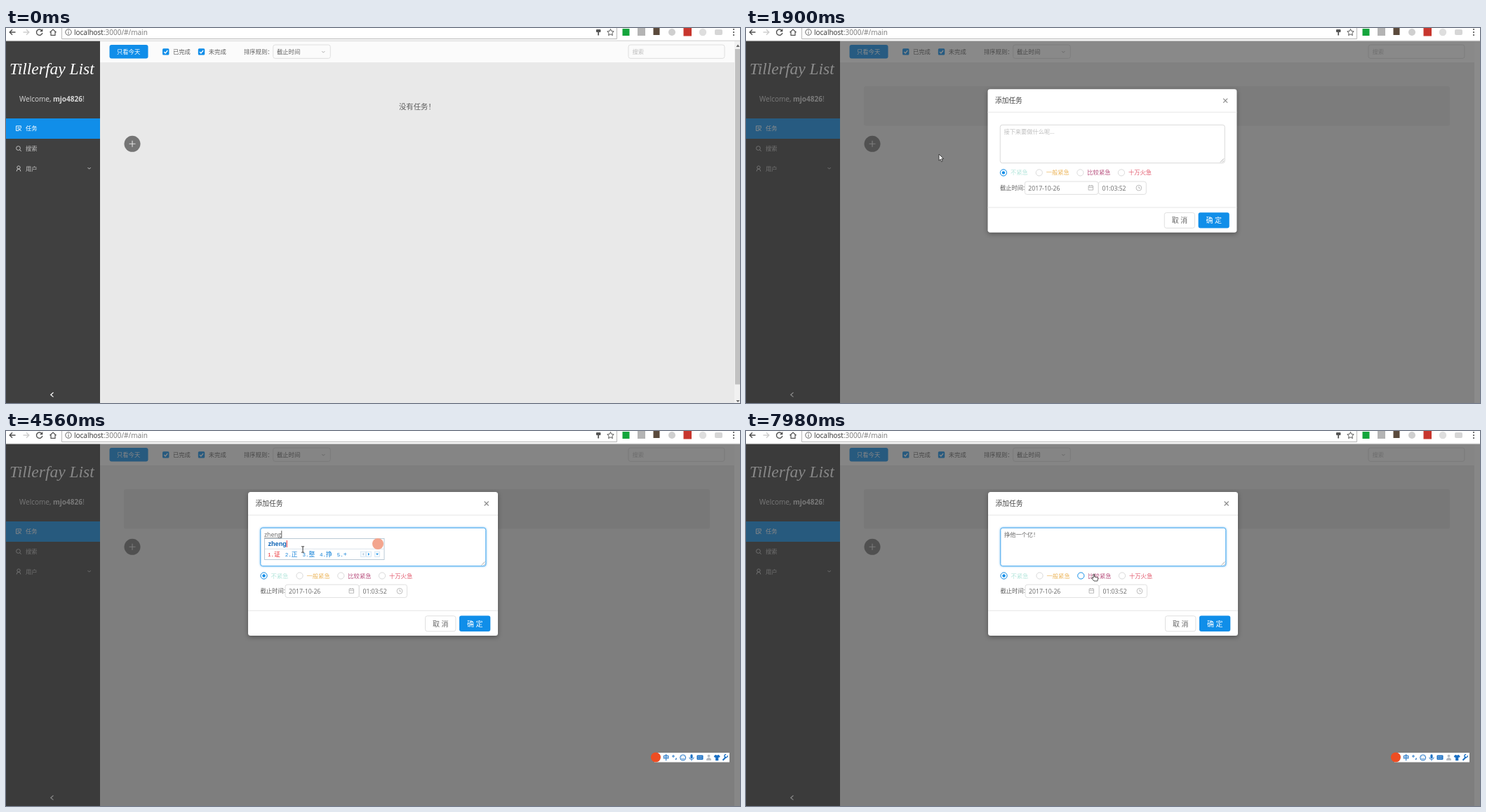
Recreate the animation shown at these times as an HTML page. Size 1046 by 535 pixels, loop 8000 ms.

```html
<!DOCTYPE html>
<html>
<head>
<meta charset="utf-8">
<style>
html, body { margin: 0; width: 100%; height: 100%; overflow: hidden; background: #fff; }
svg { display: block; font-family: "Open Sans", "Noto Sans CJK SC", sans-serif; }
text { white-space: pre; }
</style>
</head>
<body>
<svg id="stage" width="1046" height="535" viewBox="0 0 1046 535"></svg>
<script>
const BLUE = '#108ee9', LOOP = 8000;

const text = (x, y, size, fill, s, more = '') =>
  `<text x="${x}" y="${y}" font-size="${size}" fill="${fill}" ${more}>${s}</text>`;
const rect = (x, y, w, h, fill, more = '') =>
  `<rect x="${x}" y="${y}" width="${w}" height="${h}" fill="${fill}" ${more}/>`;
const box = (x, y, w, h, stroke = '#d9d9d9', fill = '#fff') =>
  rect(x, y, w, h, fill, `rx="3" stroke="${stroke}" stroke-width=".8"`);
const dot = (x, y, r, fill, more = '') =>
  `<circle cx="${x}" cy="${y}" r="${r}" fill="${fill}" ${more}/>`;
const line = (d, stroke, w = 1, more = '') =>
  `<path d="${d}" fill="none" stroke="${stroke}" stroke-width="${w}" ${more}/>`;
const shape = (d, fill, more = '') => `<path d="${d}" fill="${fill}" ${more}/>`;

const chrome = () =>
  rect(0, 0, 1046, 18, '#fff') +
  line('M0 18.2H1046', '#c4c4c4', .8) +
  line('M13.5 6H5.5M9 2.2L5.2 6L9 9.8', '#505050', 1.4) +
  line('M24.5 6H32.5M29 2.2L32.8 6L29 9.8', '#cfcfcf', 1.4) +
  line('M51 3.6A4.2 4.2 0 1 0 51.8 7', '#505050', 1.4) + shape('M52.3 1V5.2H48Z', '#505050') +
  line('M62.5 6.2L67 2L71.5 6.2M64 5.5V10.3H70V5.5', '#505050', 1.2) +
  line('M79.5 0V15.5H870.5V0', '#b9b9b9') +
  dot(89, 6, 4.2, 'none', 'stroke="#666"') + line('M89 5.4V8.6M89 3.3V4.4', '#666') +
  text(97, 9.5, 10, '#333', 'localhost<tspan fill="#767676">:3000/#/main</tspan>') +
  rect(841, 2, 6.5, 4, '#555', 'rx="1"') + line('M844.2 5V10.5', '#555', 1.8) +
  shape('M861.5 1.5l1.4 3 3.3.4-2.4 2.3.6 3.3-2.9-1.6-2.9 1.6.6-3.3-2.4-2.3 3.3-.4z', 'none', 'stroke="#555"') +
  rect(878.5, 1, 10, 10, '#14a53c') +
  rect(900, 0, 11, 11, '#b4b4b4') +
  rect(922.5, 0, 9, 10, '#5b4a3c') +
  dot(949, 6, 5, '#cfcfcf') +
  rect(965.5, 0, 11.5, 11.5, '#c8362e') +
  dot(993, 6, 5.2, '#dedede') +
  rect(1010, 2, 11, 8, '#d6d6d6', 'rx="2"') +
  [2, 6, 10].map(y => dot(1037, y, 1.1, '#505050')).join('');

const sidebar = () =>
  rect(0, 18.5, 134, 516.5, '#404040') +
  text(5, 66, 23.5, '#fff', 'Tillerfay List', 'font-family="Liberation Serif, serif" font-style="italic"') +
  text(19, 105, 10, '#d8d8d8', 'Welcome, <tspan font-weight="700">mjo4826</tspan>!') +
  rect(0, 129, 134, 29, BLUE) +
  line('M18 146.5H14.5V139.8H21.3V143M16.3 142H19.5M16.3 144H18M18.8 144L21.8 147M18.8 144V146.5M18.8 144H21', '#fff', .9) +
  text(28, 146.3, 8.3, '#fff', '任务') +
  dot(17.5, 171.5, 2.9, 'none', 'stroke="#c4c4c4"') + line('M19.6 173.6L21.8 176', '#c4c4c4') +
  text(28, 175.3, 8.3, '#c4c4c4', '搜索') +
  dot(18, 199, 2.2, 'none', 'stroke="#c4c4c4"') + line('M15.2 204.5Q15.2 201.2 18 201.2T20.8 204.5', '#c4c4c4') +
  text(28, 203.8, 8.3, '#c4c4c4', '用户') +
  line('M116.5 199L118.6 201.2L120.7 199', '#c4c4c4') +
  line('M67.5 520L63.8 523.2L67.5 526.4', '#fff', 1.2);

const checkbox = (x, label) =>
  rect(x, 29.2, 9.4, 9.4, BLUE, 'rx="1.5"') +
  line(`M${x + 2.2} 34L${x + 4.1} 36L${x + 7.3} 32`, '#fff', 1.3) +
  text(x + 15, 37.2, 8.3, '#5c5c5c', label);

const page = () =>
  rect(134, 18.5, 904, 31, '#fbfbfb') +
  rect(134, 49, 904, 486, '#e9e9e9') +
  rect(147.5, 24, 55, 19.6, BLUE, 'rx="3"') +
  text(158, 37.2, 8.3, '#fff', '只看今天') +
  checkbox(223, '已完成') + checkbox(273.8, '未完成') +
  text(339, 37.2, 8.3, '#5c5c5c', '排序规则：') +
  box(380.7, 24, 81.6, 19.4, '#d9d9d9', '#fbfbfb') +
  text(386, 37.2, 8.3, '#5c5c5c', '截止时间') +
  line('M450.2 33L452.3 35.2L454.4 33', '#aaa', .9) +
  box(887, 24, 137, 19.4, '#d9d9d9', '#fbfbfb') +
  text(892.5, 37.2, 8.3, '#bdbdbd', '搜索') +
  rect(168, 83, 835, 56.5, '#dbdbdb', 'rx="3" id="card"') +
  text(560, 115.8, 10.35, '#5c5c5c', '没有任务！', 'id="empty"') +
  dot(180, 165.3, 11.5, '#757575', 'id="plus"') +
  line('M175.5 165.3H184.5M180 160.8V169.8', '#e0e0e0', 1.1) +
  '<g id="scroll">' + rect(1038, 18.5, 8, 516.5, '#f1f1f1') + rect(1039, 30, 7, 478.5, '#c1c1c1') +
  shape('M1040.5 27L1043 23.5L1045.5 27ZM1040.5 531L1043 534L1045.5 531Z', '#666') + '</g>';

const radio = (x, label, color, id = '') =>
  dot(x, 206.5, 4.6, '#fff', `stroke="#d9d9d9" ${id}`) + text(x + 10, 209.6, 8.3, color, label);

const modal = () =>
  rect(345, 87, 356, 205, '#fff', 'rx="3.5" style="filter:drop-shadow(0 2px 3px #0005)"') +
  text(355.5, 107, 9.75, '#444', '添加任务') +
  line('M681.7 100.5l6 6m0-6l-6 6', '#888', 1.1) +
  line('M345 120H701M345 256.3H701', '#e6e6e6') +
  rect(362.8, 138.2, 321, 54.5, '#fff', 'rx="3" id="area"') +
  line('M677.5 191.5l5-5m-2 5l2-2', '#999', .8) +
  radio(367.5, '不紧急', '#b5e6dc') +
  radio(418.5, '一般紧急', '#ecb65c') +
  radio(477.3, '比较紧急', '#b8507e', 'id="third"') +
  radio(536, '十万火急', '#e2566a') +
  dot(367.5, 206.5, 4.6, '#fff', `stroke="${BLUE}"`) + dot(367.5, 206.5, 2.2, BLUE) +
  text(362.5, 231.4, 8.3, '#5c5c5c', '截止时间:') +
  box(398, 219.2, 105, 18.4) + text(403, 231.8, 8.7, '#666', '2017-10-26') +
  line('M489 225.3H495.5V231.3H489ZM489 227.6H495.5M490.7 224V226M493.8 224V226', '#aaa', .8) +
  box(503.5, 219.2, 68, 18.4) + text(508.5, 231.8, 8.6, '#666', '01:03:52') +
  dot(561, 228.3, 3.9, 'none', 'stroke="#aaa" stroke-width=".8"') + line('M561 226V228.6H563', '#aaa', .8) +
  box(597.5, 263.8, 43.4, 22) + text(608, 278.8, 10, '#666', '取 消') +
  rect(646, 263.5, 44.3, 22.4, BLUE, 'rx="3"') + text(657, 278.8, 10, '#fff', '确 定');

const imeBar = () => {
  const c = '#1b70c4';
  return rect(924, 459, 107, 13.5, '#fff') + dot(926, 465.5, 7, '#ee4d22') +
    text(936.3, 469.2, 8.8, c, '中', 'font-weight="700"') +
    dot(951, 464, 1.2, 'none', `stroke="${c}"`) + line('M955 466.5q.6 1.3-.8 2.5', c, 1.3) +
    dot(964.7, 466, 4, 'none', `stroke="${c}"`) + line('M962.5 467q2.2 2.5 4.4 0M963.2 464.3v.9M966.2 464.3v.9', c, .9) +
    rect(975.4, 461.3, 3.2, 6, c, 'rx="1.6"') + line('M973.8 465.5q0 3 3.2 3t3.2-3M977 468.5v2', c, .9) +
    rect(984.5, 462.5, 9, 6.5, c, 'rx="1"') + line('M986 464.7H992M986 467H992', '#fff', .8, 'stroke-dasharray="1 .6"') +
    dot(1001.5, 463.6, 1.9, '#b5bcc4') + shape('M998 470q0-4 3.5-4t3.5 4z', '#b5bcc4') +
    shape('M1011 462h1l1.2 1 1.2-1h1l2.4 2-1.5 2-1-.6v4.9h-4.2v-4.9l-1 .6-1.5-2z', c) +
    line('M1021.5 469.8L1026 465', c, 2) + line('M1028.2 463.2a2.2 2.2 0 1 1-2-1.8', c, 1.4);
};

const pointers = {
  arrow: shape('M0 0V9.2l2.1-2 1.5 3.5 1.5-.7-1.5-3.3h3z', '#fff', 'stroke="#222" stroke-width=".8"'),
  beam: line('M-2-4.2H-.5L0-3.8L.5-4.2H2M0-4V4M-2 4.2H-.5L0 3.8L.5 4.2H2', '#222', .9),
  hand: shape('M2 .5q1-1 1.6.2V4l4 .9q1.3.4 1 1.8L7.8 10H3L-.6 6q.3-1.6 2.4 0z', '#fff', 'stroke="#222" stroke-width=".8"')
};

stage.innerHTML =
  sidebar() + page() +
  rect(0, 18.5, 1046, 516.5, '#373737', 'id="mask"') +
  chrome() +
  `<g id="dialog">${modal()}</g><g id="entry"></g><g id="bar">${imeBar()}</g><g id="pointer"></g>`;

// Input method candidates by pinyin; a leading ~ marks a cloud result
const words = {
  "z": '在 这 中 自 +', "zh": '这 中 只 着 +', "zhe": '这 着 者 折 +', "zhen": '真 阵 镇 针 +',
  "zheng": '证 正 整 挣 +',
  "zheng't": '整体 政体 正体 整天 正态', "zheng'ta": '证他 整他 挣他 正他 挣它',
  "zheng'ta'y": '整他一 证他 整他 证 正', "zheng'ta'yi": '证他一 证他 整他 证 正',
  "zheng'ta'yi'g": '挣它一个 证他一个 整他 证 正', "zheng'ta'yi'ge": '挣它一个 证他一个 整他 证 正',
  "zheng'ta'yi'ge ": '~挣它一个 证他一个 整他 证 正',
  "zheng'ta'yi'ge'y": '~挣他一个用 证他一个 整他 挣他 正', "zheng'ta'yi'ge'yi": '挣他一个亿 整他 挣他 证 正'
};

// Keys: '' shows the hint, '|' the caret alone; pinyin opens the popup
const typing = [
  [0, ''], [2390, '|'], [2680, ''], [3020, '|'], [3130, "z"], [3230, "zh"], [3340, "zhe"], [3450, "zhen"],
  [3550, "zheng"], [3970, "zheng't"], [4070, "zheng'ta"], [4170, "zheng't"], [4270, "zheng"], [4360, "zhen"],
  [4560, "zheng"], [4770, "zheng't"], [4880, "zheng'ta"], [5220, "zheng'ta'y"], [5320, "zheng'ta'yi"],
  [5430, "zheng'ta'yi'g"], [5520, "zheng'ta'yi'ge"], [5620, "zheng'ta'yi'ge "], [5950, "zheng'ta'yi'ge'y"],
  [6040, "zheng'ta'yi'ge'yi"], [6590, '挣他一个亿'], [6700, '挣他一个亿|'], [7140, '挣他一个亿！|'], [7550, '挣他一个亿！']
];
const moves = [
  [1030, 'arrow', 188, 169], [1130, 'arrow', 183, 169], [1220, 'arrow', 180, 169],
  [1790, 'arrow', 223, 176], [1900, 'arrow', 275, 180], [2010, 'arrow', 322, 180], [2110, 'beam', 372, 177],
  [2200, 'beam', 408, 171], [2290, 'beam', 423, 169], [7550, 'beam', 425, 171], [7660, 'beam', 436, 177],
  [7770, 'beam', 452, 186], [7870, 'arrow', 474, 196], [7980, 'hand', 493, 204]
];
// time, dialog scale, dialog opacity, mask opacity
const opening = [[0, 0, 0, 0], [1650, .542, .42, .04], [1790, .967, .97, .45], [1900, .997, 1, .58], [2010, 1, 1, .6]];

const at = (list, t) => list.findLast(e => e[0] <= t);
const set = (el, attrs) => { for (const k in attrs) el.setAttribute(k, attrs[k]); };
const pen = document.createElement('canvas').getContext('2d');
const width = (font, s) => { pen.font = font; return pen.measureText(s).width; };

function popup(key) {
  const pinyin = key.trim();
  let x = 373, list = '';
  words[key].split(' ').forEach((w, i) => {
    const word = w.replace('~', ''), color = i ? '#1583d8' : '#e8282c';
    list += text(x, 178.8, 7.5, color, i + 1 + '.', 'font-family="Liberation Mono, monospace"') +
      text(x + 9, 178.8, 8.7, color, word);
    x += 16 + 8.7 * word.length;
    if (w !== word) {
      list += shape(`M${x - 6} 174.5q-1.6-2 .8-2.4q1.6-1.8 2.8.2q2 .6.8 2.2z`, 'none', 'stroke="#f0642c" stroke-width=".7"');
      x += 9;
    }
  });
  const right = Math.max(539, x + 34);
  const caret = 374 + width('700 9.1px "Liberation Sans"', pinyin);
  const key3 = [[31, 'M2-2L0 0L2 2Z', '#b5c8d8'], [23, 'M0-2L2 0L0 2Z', BLUE], [11, 'M-1-1H3L1 1.2Z', BLUE]];
  return rect(368.4, 153.4, right - 368.4, 30.2, '#fff', 'stroke="#a9bccb" stroke-width=".8"') +
    line(`M369 168.3H${right}`, '#d5dfe7', .8) +
    text(373.5, 164, 9.1, '#0b62b5', pinyin, 'font-weight="700" font-family="Liberation Sans, sans-serif"') +
    line(`M${caret} 156V166`, '#e8282c', .9) + dot(right - 9, 161, 8, '#f3a58e') + list +
    key3.map(([dx, d, c]) => rect(right - dx - 2.5, 172, 7, 7.5, '#f4f9fd', 'stroke="#c5dcee" stroke-width=".6"') +
      shape(d, c, `transform="translate(${right - dx} 175.7)"`)).join('');
}

function drawEntry(key) {
  const open = key in words, plain = key.replace(/['| ]/g, '');
  const end = 368.4 + (open ? width('8.7px "Open Sans"', plain) : 8.2 * plain.length);
  let out = plain ? text(368, 151, open ? 8.7 : 8.2, '#666', plain) : text(368, 151, 8.25, '#bdbdbd', '接下来要做什么呢...');
  if (open || key.endsWith('|')) out += line(`M${end} 142.3V152.7`, '#333', .8);
  if (open) out += line(`M368 152.9H${end}`, '#555', .8) + popup(key);
  return out;
}

function cursorAt(t) {
  if (t < 180) return null;
  if (t >= 1030) return at(moves, t).slice(1);
  const k = Math.min(7, Math.floor((t - 180) / 102.8)) / 7, j = 1 - k;
  const curve = (a, b, c) => a * j * j + 2 * b * j * k + c * k * k;
  return ['arrow', curve(874, 420, 195), curve(460, -51, 168)];
}

let shown;
function frame(now) {
  const t = now % LOOP;
  const [, scale, alpha, dim] = at(opening, t);
  const focus = t >= 2390, hover = t >= 1030 && t < 1900;
  const place = { opacity: alpha, transform: `translate(176 168) scale(${scale}) translate(-176 -168)` };
  set(dialog, place);
  set(entry, place);
  set(mask, { opacity: dim });
  set(card, { opacity: t >= 1650 ? 1 : 0 });
  set(empty, { opacity: t < 1790 ? 1 : 0 });
  set(document.getElementById('scroll'), { opacity: t < 1650 ? 1 : 0 });
  set(plus, { r: hover ? 12 : 11.5, fill: hover ? '#626262' : '#757575', stroke: hover ? '#49a9ee' : 'none', 'stroke-width': 1.2 });
  set(area, { stroke: focus ? '#49a9ee' : '#d9d9d9', style: focus ? 'filter:drop-shadow(0 0 1.5px #108ee999)' : '' });
  set(third, { stroke: t >= 7980 ? BLUE : '#d9d9d9' });
  set(bar, { opacity: focus ? 1 : 0 });

  const key = at(typing, t)[1];
  if (key !== shown) entry.innerHTML = drawEntry(shown = key);

  const cur = cursorAt(t);
  pointer.innerHTML = cur ? `<g transform="translate(${cur[1]} ${cur[2]})">${pointers[cur[0]]}</g>` : '';
  requestAnimationFrame(frame);
}
requestAnimationFrame(frame);
</script>
</body>
</html>
```
